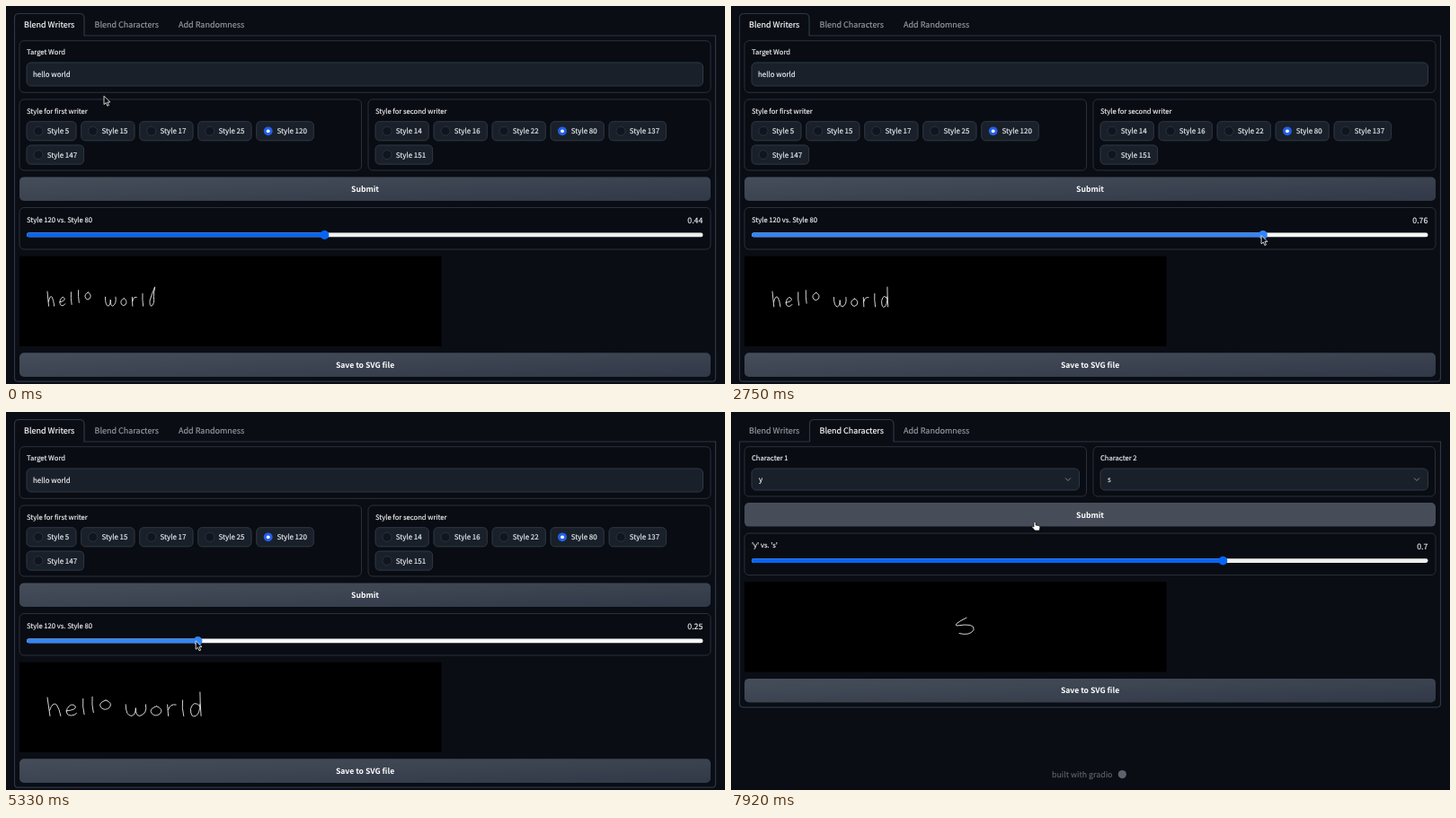
Write an HTML page that moves like this. It is 800 by 421 pixels and loops after 8 s.

```html
<!DOCTYPE html>
<html lang="en">
<head>
<meta charset="utf-8">
<title>Handwriting blender</title>
<style>
  html, body { margin: 0; width: 100%; height: 100%; overflow: hidden; background: #0a0d14; }
  svg { display: block; width: 100vw; height: 100vh; }
  text {
    font-family: "Noto Sans CJK JP", "Noto Sans CJK SC", "Noto Sans CJK", "Noto Sans", sans-serif;
    font-size: 7.65px; color: #f0f2f6; fill: currentColor; stroke: currentColor; stroke-width: .16;
    text-rendering: geometricPrecision; white-space: pre;
  }
  .tab { font-size: 9px; }
  .entry { font-size: 7.95px; }
  .num { font-size: 8.75px; text-anchor: end; }
  .btn { font-size: 8.6px; font-weight: 600; text-anchor: middle; color: #fff; stroke: none; }
  .foot { font-size: 8.8px; color: #5d626d; }
  .block { fill: #090c12; stroke: #29313d; }
  .field { fill: #19202a; stroke: #2f3846; }
  .radio { fill: #10151f; stroke: #303845; stroke-width: .8; }
  #ink path { fill: none; stroke: #ececec; stroke-width: .9; vector-effect: non-scaling-stroke; stroke-linecap: round; }
</style>
</head>
<body>
<svg id="stage" viewBox="0 0 800 421" preserveAspectRatio="none"></svg>
<script>
const LOOP = 8000, FPS = 12, SWITCH = 7420, HOLD = 165, LIFT = -89.4;
const START = { x: 107, y: 99, value: .44 };

// Cursor moves; a drag also carries the slider knob along
const MOVES = [
  { from: 0, to: 830, x: 354.5, y: 254 },
  { from: 1080, to: 1670, x: 555, y: 255, drag: true },
  { from: 1750, to: 2170, x: 557, y: 244.5 },
  { from: 2250, to: 2580, x: 555, y: 255 },
  { from: 2660, to: 3240, x: 673.5, y: 257, drag: true },
  { from: 3330, to: 3415, x: 674, y: 249.5 },
  { from: 4080, to: 5580, x: 198.7, y: 255, drag: true },
  { from: 6120, to: 6920, x: 190, y: 239 },
  { from: 7000, to: 7165, x: 122.5, y: 17 },
  { from: SWITCH, to: 7915, x: 338, y: 122 }
];
const LOOK = {
  rest: ['#0566f6', '#efefef'],
  hover: ['#0750be', '#e0e0e0'],
  active: ['#3285fa', '#f6f6f6']
};
// Time and stretch of each handwriting sample
const INK = [[0, .55], [1910, .64], [3660, 1.06], [5490, .58], [5990, .55]];

// Pen strokes in a 10 x 10 box, with width and height at full stretch
const GLYPHS = {
  h: ['M0 0Q1 5 2 10M1.7 7Q4 2 7 4Q9 6 10 10', 14, 17],
  e: ['M0 6Q10 5 9 2Q5-2 1 4Q-1 10 5 10Q8 10 10 8', 11, 10.5],
  l: ['M3 0Q1 5 6 10', 4, 14.5],
  o: ['M5 0Q-3 3 1 8Q4 11 8 8Q12 3 5 0', 11.5, 9],
  w: ['M0 0Q0 10 3 10Q5 9 5 3Q5 10 7 10Q11 8 10 0', 21, 10.5],
  r: ['M0 1L1 10M1 5Q3 0 10 1', 9, 11.5],
  d: ['M9 0Q9 5 10 10M9 6Q3 3 0 7Q0 11 5 10Q9 9 9 5', 11, 22],
  loopD: ['M10 0Q4 4 1 7Q0 10 4 10Q10 9 8 5Q8 3 10 0', 11, 22]
};
const LETTER_S = '<path d="M262 318.5Q247 326 251 327.4Q272 324 270 332Q266 339 254 336"/>';

const stage = document.getElementById('stage');
const get = id => document.getElementById(id);
const set = (id, attrs) => { for (const k in attrs) get(id).setAttribute(k, attrs[k]); };
const show = (id, on) => set(id, { visibility: on ? 'visible' : 'hidden' });

const box = (x, y, r, b, cls, rad = 5) =>
  `<rect class="${cls}" x="${x}" y="${y}" width="${r - x}" height="${b - y}" rx="${rad}"/>`;
const text = (x, y, str, cls = '', id = '') => `<text id="${id}" class="${cls}" x="${x}" y="${y}">${str}</text>`;
const button = (y, label, id = '') =>
  `<rect id="${id}" x="15" y="${y}" width="769" height="26.6" rx="5" fill="url(#steel)"/>` + text(399.5, y + 16.6, label, 'btn');

function radios(left, nums, chosen) {
  let x = left, y = 128.7, out = '';
  nums.forEach((n, i) => {
    if (i === 5) { x = left; y = 155; }
    const w = 50.7 + 4.3 * String(n).length, cx = x + 13, cy = y + 10.6;
    out += box(x, y, x + w, y + 21.2, 'field', 4.5) + (n === chosen
      ? `<circle cx="${cx}" cy="${cy}" r="4.9" fill="#2460e8"/><circle cx="${cx}" cy="${cy}" r="1.9" fill="#fff"/>`
      : `<circle class="radio" cx="${cx}" cy="${cy}" r="5"/>`) +
      text(x + 22.8, cy + 3, 'Style ' + n, 'entry');
    x += w + 5.7;
  });
  return out;
}

const select = (x, label, value) =>
  box(x - 8, 38.7, x + 372.5, 94, 'block') + text(x, 54.4, label) + box(x, 63, x + 364.5, 87, 'field') +
  text(x + 8, 78, value, 'entry') + `<path d="M${x + 349} 73.5l3 3 3-3" fill="none" stroke="#7d8490"/>`;

// Letters follow each other; the first word climbs off its base line
function handwriting(stretch) {
  const tall = .95 + (stretch - .55) / 2, base = 318 + 17 * tall;
  let x = 46, out = '';
  [...'hello world'].forEach((c, i) => {
    if (c === ' ') { x += 10; return; }
    const [d, w, h] = GLYPHS[c === 'd' && stretch < .6 ? 'loopD' : c];
    const height = h * tall, rise = i < 5 ? .42 * i * i : 0;
    out += `<path d="${d}" transform="translate(${x} ${base - rise - height}) scale(${w * stretch / 10} ${height / 10})"/>`;
    x += w * stretch + 6;
  });
  return out;
}

stage.innerHTML = `
  <defs><linearGradient id="steel" x1="0" y1="0" x2="1" y2="1">
    <stop stop-color="#464d5a"/><stop offset="1" stop-color="#313948"/>
  </linearGradient></defs>
  <path id="frame" fill="none" stroke="#2d3746" stroke-width="1.2"/>
  ${text(20, 24, 'Blend Writers', 'tab', 'tab1')}
  ${text(98.5, 24, 'Blend Characters', 'tab', 'tab2')}
  ${text(192, 24, 'Add Randomness', 'tab', 'tab3')}
  <g id="writers">
    ${box(15, 38.7, 784, 96.3, 'block')}${text(23, 54.4, 'Target Word')}
    ${box(23, 63, 775.5, 89, 'field')}${text(30, 79, 'hello world', 'entry')}
    ${box(15, 104, 395.5, 183, 'block')}${text(23, 120, 'Style for first writer')}
    ${radios(23, [5, 15, 17, 25, 120, 147], 120)}
    ${box(403, 104, 784, 183, 'block')}${text(411, 120, 'Style for second writer')}
    ${radios(411, [14, 16, 22, 80, 137, 151], 80)}
  </g>
  <g id="chars">${select(23, 'Character 1', 'y')}${select(411, 'Character 2', 's')}</g>
  <g id="lower">
    ${button(190.4, 'Submit', 'submit')}
    ${box(15, 224.5, 784, 271, 'block')}
    ${text(23, 240.6, '', '', 'label')}${text(775.3, 242.3, '', 'num', 'value')}
    <rect id="track" x="23" y="252.6" width="752.5" height="4.7" rx="2.3"/>
    <rect id="fill" x="23" y="252.6" height="4.7" rx="2.3"/>
    <circle id="thumb" cy="255" r="4.9"/>
    <rect x="15" y="278.7" width="469.5" height="100.3" fill="#000"/>
    <g id="ink"></g>
    ${button(386.3, 'Save to SVG file')}
    ${text(357, 496.2, 'built with gradio', 'foot')}<circle cx="435.3" cy="493" r="4.6" fill="#5d626d"/>
  </g>
  <g id="cursor">
    <path id="arrow" d="M0 0V9.4L2.2 7.4 3.8 11 5.4 10.3 3.8 6.8H6.8Z" fill="#000" stroke="#fff" stroke-width=".8"/>
    <path id="hand" d="M-1 1Q0-.7 1 1V4L4.6 4.7Q6.1 5.1 5.8 6.6L5 10H.3L-3 6.4Q-2.6 4.9-1 6Z" fill="#fff" stroke="#000" stroke-width=".6"/>
  </g>`;

const easeOut = u => 1 - (1 - u) ** 2;
const mix = (a, b, u) => a + (b - a) * u;

function pose(t) {
  let { x, y, value } = START, pressed = false;
  for (const m of MOVES) {
    if (t < m.from) break;
    const u = easeOut(Math.min(1, (t - m.from) / (m.to - m.from)));
    x = mix(x, m.x, u);
    y = mix(y, m.y, u);
    if (m.drag) {
      value = mix(value, (m.x - 28) / 742, u);
      pressed = t < m.to + HOLD;
    }
  }
  return { x, y, value, pressed };
}

function draw(t) {
  const second = t >= SWITCH;
  const { x, y, value, pressed } = pose(t);
  const onTab = y > 8 && y < 33 && x > 88 && x < 181;
  const onSubmit = second && y > 101 && y < 128;
  const onSlider = !second && Math.abs(y - 255) < 6;

  const a = second ? 87.5 : 9.5, b = second ? 181 : 87, bottom = second ? 328.8 : 418.2;
  set('frame', { d: `M${a} 33V13.5q0-5 5-5H${b - 5}q5 0 5 5V33H789.5V${bottom - 4}q0 4-4 4H13.5q-4 0-4-4V33H${a}` });
  ['tab1', 'tab2', 'tab3'].forEach((id, i) => {
    const lit = i === +second || (i === 1 && onTab);
    get(id).style.color = lit ? '#fff' : '#969ba5';
  });
  show('writers', !second);
  show('chars', second);
  set('lower', { transform: `translate(0 ${second ? LIFT : 0})` });
  set('submit', { fill: onSubmit ? '#464d59' : 'url(#steel)' });

  const v = second ? .7 : Math.round(value * 100) / 100, knob = 28 + v * 742;
  const [blue, pale] = LOOK[pressed ? 'active' : onSlider ? 'hover' : 'rest'];
  get('label').textContent = second ? "'y' vs. 's'" : 'Style 120 vs. Style 80';
  get('value').textContent = v;
  set('track', { fill: pale });
  set('fill', { fill: blue, width: knob - 23 });
  set('thumb', { fill: blue, cx: knob });
  get('ink').innerHTML = second ? LETTER_S : handwriting(INK.filter(s => s[0] <= t).pop()[1]);

  set('cursor', { transform: `translate(${x} ${y})` });
  show('hand', onTab || onSubmit);
  show('arrow', !onTab && !onSubmit);
}

const start = performance.now();
let shown = -1;
function tick() {
  const t = (performance.now() - start) % LOOP;
  const step = Math.floor((t + 3.4) * FPS / 1000) % (LOOP * FPS / 1000);
  if (step !== shown) draw(step * 1000 / FPS + 3.4);
  shown = step;
  requestAnimationFrame(tick);
}
tick();
</script>
</body>
</html>
```
